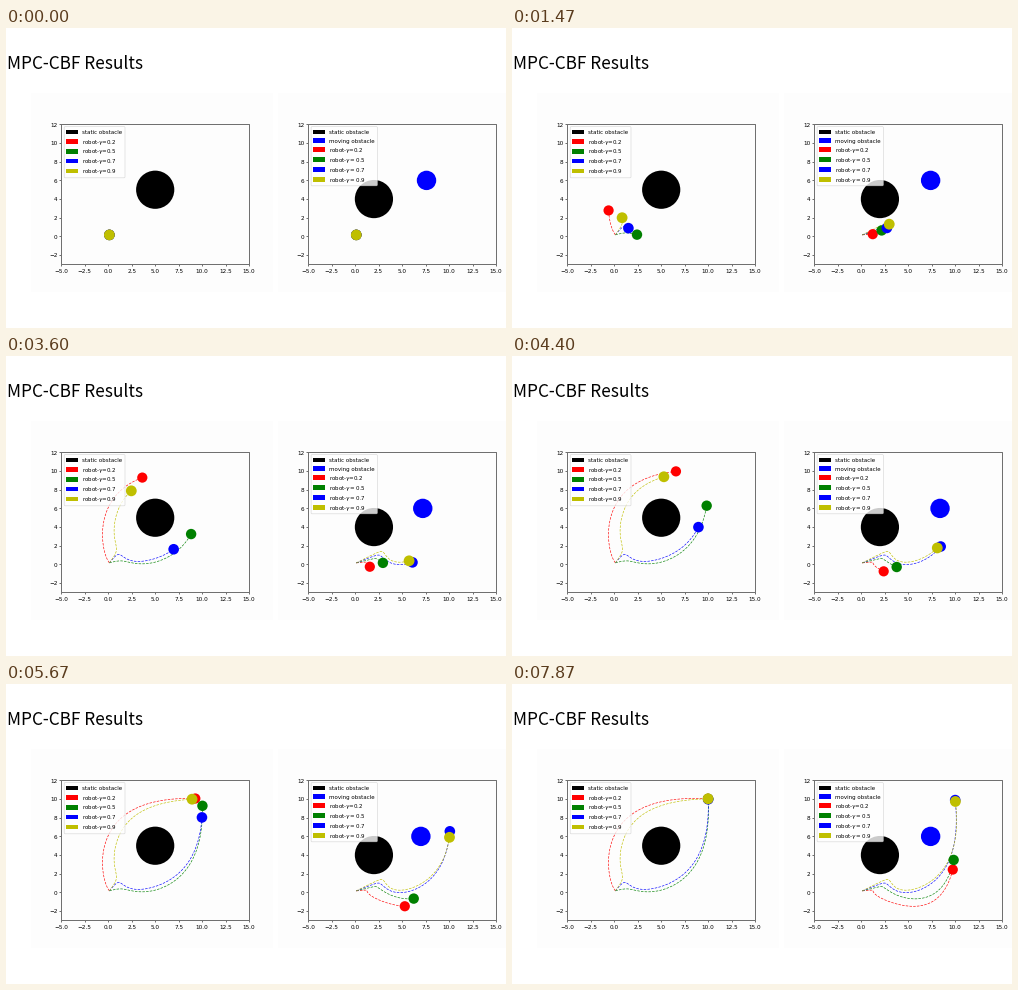
A matplotlib script that plays this animation: 500 by 300 pixels, repeating every 8000 ms.

```python
import numpy as np
import matplotlib.pyplot as plt
from matplotlib.animation import FuncAnimation
from matplotlib.patches import Circle, FancyBboxPatch, Rectangle

W, H, DPI = 500, 300, 100
STEPS, TICK = 80, 40
COLORS = ["r", "g", "b", "y"]
PX = 72 / DPI  # points per pixel
START, GOAL = (0.12, 0.16), (10, 10.03)

# Per robot: side kick, how long it lasts, two Bezier handles, time scale, ease power
LEFT = [
    ((-0.25, 0.2), 20, (-1.5, 5.0), (-0.2, 10.6), 31.8, 2.25),
    ((1.0, 0.35), 20, (3.4, -0.55), (10.6, -0.5), 33, 2.4),
    ((0.8, 1.05), 20, (3.87, -0.1), (10.4, 0.4), 40, 2.7),
    ((0.75, 1.0), 20, (0.9, 3.65), (-0.9, 9.8), 35.7, 2.6),
]
RIGHT = [
    ((1.1, 0.1), 36, (3.0, -1.0), (11.5, -6.0), 69.4, 3.4),
    ((2.0, 0.5), 44, (4.0, -0.4), (11.3, -4.3), 68, 3.2),
    ((2.3, 0.95), 28, (3.87, -0.9), (11.2, -0.9), 44, 2.9),
    ((2.6, 1.35), 28, (3.6, -0.6), (11.4, -0.5), 45.5, 2.8),
]


def route(kick, hold, p1, p2, scale, power):
    """Positions at every step: a Bezier to the goal plus a fading kick."""
    k = np.arange(STEPS)[:, None]
    u = 1 - np.exp(-(k / scale) ** power)
    curve = sum(c * np.array(p) for c, p in zip(
        [(1 - u) ** 3, 3 * u * (1 - u) ** 2, 3 * u * u * (1 - u), u ** 3],
        [START, p1, p2, GOAL]))
    fade = (1 - np.exp(-(k / 6) ** 2)) * np.exp(-(k / hold) ** 4)
    return curve + fade * np.array(kick)


fig = plt.figure(figsize=(W / DPI, H / DPI), dpi=DPI, facecolor="white")
ax = fig.add_axes([0, 0, 1, 1])
ax.set(xlim=(0, W), ylim=(H, 0))
ax.axis("off")


def label(x, y, s, ha="left", size=5.5, **kw):
    ax.text(x, y, s, ha=ha, va="baseline", fontsize=size * PX, zorder=7, **kw)


def disc(x, y, r, color, z):
    return ax.add_patch(Circle((x, y), r, fc=color, ec="none", zorder=z))


def line(xs, ys, color="#707070"):
    ax.plot(xs, ys, color=color, lw=PX, zorder=4, solid_capstyle="butt")


class Panel:
    TOP, BOTTOM, WIDTH = 96.4, 236.4, 187.8

    def __init__(self, left, robots):
        self.left = left
        ax.add_patch(Rectangle((left - 30, 65), 242, 199, fc="#fdfdfd", zorder=0))
        self.draw_axes()
        self.tracks, self.trails, self.discs = [], [], []
        for i, (spec, c) in enumerate(zip(robots, COLORS)):
            track = np.column_stack(self.pos(*route(*spec).T))
            self.tracks.append(track)
            self.trails += ax.plot([], [], color=c, lw=0.62 * PX, zorder=2, ls=(0, (4, 2)))
            self.discs.append(disc(*track[0], 5.1 + 0.1 * i, c, 3 + 0.1 * i))

    def pos(self, x, y):
        return (self.left + (x + 5) * self.WIDTH / 20,
                self.BOTTOM - (y + 3) * (self.BOTTOM - self.TOP) / 15)

    def draw_axes(self):
        l, r, t, b = self.left, self.left + self.WIDTH, self.TOP, self.BOTTOM
        line([l, r, r, l, l], [t, t, b, b, t])
        for v in np.arange(-5, 15.1, 2.5):
            x = self.pos(v, 0)[0]
            line([x, x], [b, b + 2])
            label(x, b + 8.5, f"{v:.1f}".replace("-", "\u2212"), "center", 5.8)
        for v in range(-2, 13, 2):
            y = self.pos(0, v)[1]
            line([l - 2, l], [y, y])
            label(l - 3.6, y + 2.2, str(v).replace("-", "\u2212"), "right", 5.8)

    def legend(self, rows, width, bottom):
        x, top = self.left + 2.9, 98.6
        ax.add_patch(FancyBboxPatch(
            (x + 1, top + 1), width - 2, bottom - top - 2,
            boxstyle="round,pad=1,rounding_size=1",
            fc="white", ec="#cccccc", lw=0.6 * PX, alpha=0.8, zorder=5))
        for y, color, text in rows:
            ax.add_patch(Rectangle((self.left + 5, y - 2.3), 11.6, 4.5, fc=color, zorder=6))
            label(self.left + 20.8, y + 2, text)

    def update(self, k):
        for track, trail, robot in zip(self.tracks, self.trails, self.discs):
            trail.set_data(*track[:k + 1].T)
            robot.center = track[k]


label(0.7, 41.4, "MPC-CBF Results", size=17.2, family="Noto Sans CJK JP", color="black")

static, moving = Panel(55.3, LEFT), Panel(302.2, RIGHT)
disc(*static.pos(5, 5), 19.1, "black", 1)
disc(*moving.pos(2, 4), 19.1, "black", 1)
walker = disc(*moving.pos(7.6, 6), 9.7, "blue", 1.5)

tight, wide = r"robot-$\gamma$={}", r"robot-$\gamma={}$"
robots = list(enumerate(zip(COLORS, ["0.2", "0.5", "0.7", "0.9"])))
static.legend(
    [(104, "black", "static obstacle")]
    + [(113.6 + 9.8 * i, c, tight.format(g)) for i, (c, g) in robots], 60.8, 149.8)
moving.legend(
    [(104, "black", "static obstacle"), (112.7, "blue", "moving obstacle")]
    + [(121.6 + 10 * i, c, (wide if i else tight).format(g)) for i, (c, g) in robots],
    66.2, 157.8)

# Odd steps come a third of a beat early
BEATS = np.array([100 * k - 33 * (k % 2) for k in range(STEPS)])


def update(n):
    k = int(np.searchsorted(BEATS, n * TICK + 30, "right")) - 1
    static.update(k)
    moving.update(k)
    swing = abs((k + 13) % 20 - 10) * 0.2
    walker.center = moving.pos(7 + swing, 6)
    return [walker]


anim = FuncAnimation(fig, update, frames=STEPS * 100 // TICK, interval=TICK,
                     repeat=True, repeat_delay=0, cache_frame_data=False)
plt.show()
```
